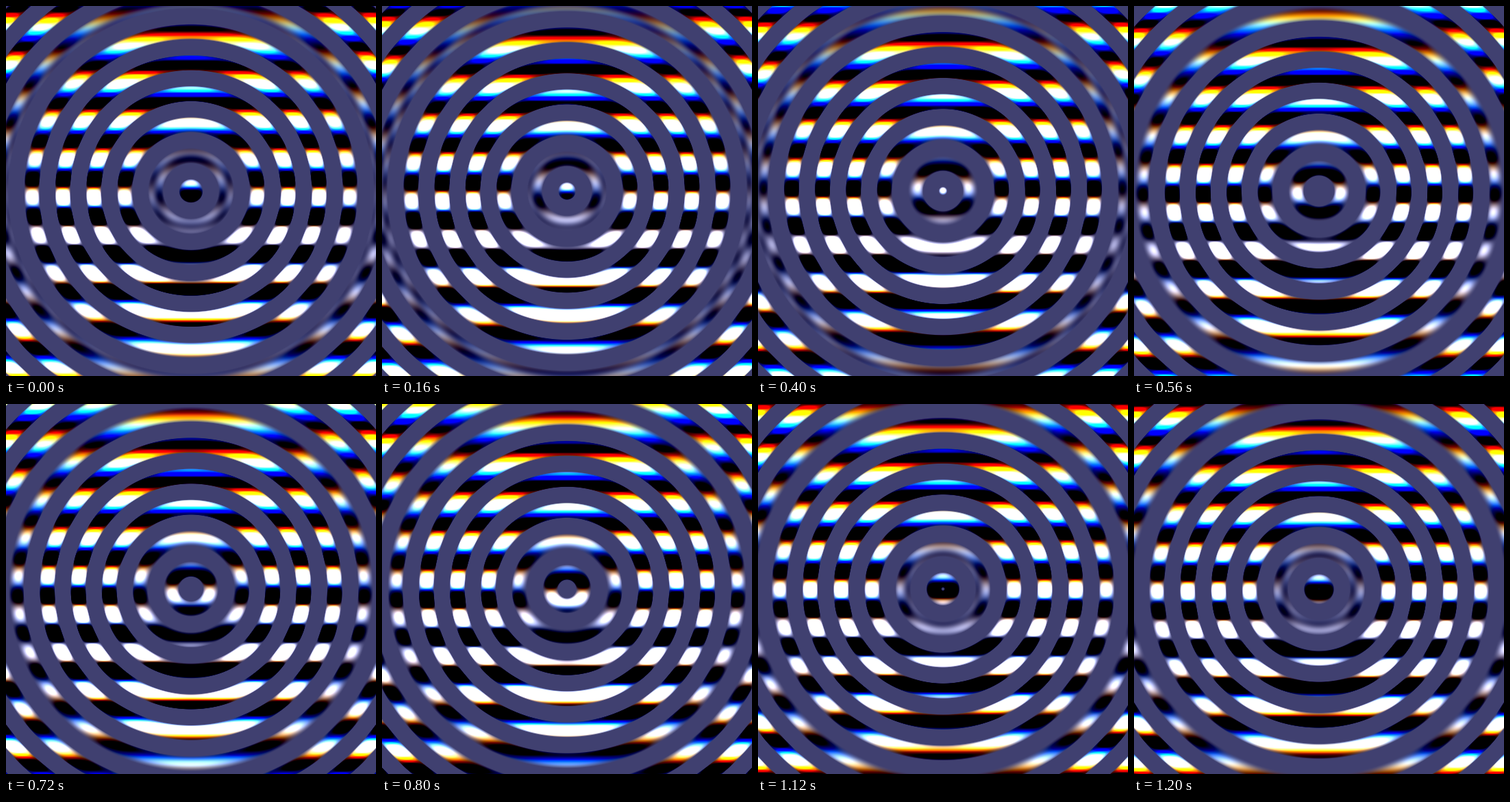
Write an HTML page with a canvas that moves like this. It is 540x540 px and loops after 1.28 s.

```html
<!DOCTYPE html>
<html lang="en">
<head>
<meta charset="utf-8">
<title>Rings and stripes</title>
<style>
  html, body { margin: 0; width: 100%; height: 100%; overflow: hidden; background: #404070; }
  canvas { display: block; width: 100vw; height: 100vh; }
</style>
</head>
<body>
<canvas id="stage" width="540" height="540"></canvas>
<script>
const SIZE = 540, MID = SIZE / 2, TAU = 2 * Math.PI;
const LOOP = 1280, STEP = 80;
const GAIN = 4;
const BASE = [64, 64, 112];

// Stripes: each channel has its own pitch; all agree at one height.
const PITCH = 56.55, SPREAD = [1, 1.02, 1.05];
const ALIGN_Y = 345, ALIGN_PHASE = 2.75;

// Rings close in on the centre, one spacing per loop.
const RING = 45.22, RING_START = 6.3;

// Slow contrast wave; the stripes invert where it crosses zero.
const FLIP_R = 53, FLIP_GAP = 218;

const ctx = document.getElementById('stage').getContext('2d');
const image = ctx.createImageData(SIZE, SIZE);
const pixels = image.data;
const radius = new Float32Array(SIZE * SIZE);
const contrast = new Float32Array(SIZE * SIZE);

for (let y = 0, i = 0; y < SIZE; y++) {
  for (let x = 0; x < SIZE; x++, i++) {
    const r = Math.hypot(x + 0.5 - MID, y + 0.5 - MID);
    radius[i] = r;
    contrast[i] = 255 * GAIN * Math.sin(Math.PI * (r - FLIP_R) / FLIP_GAP);
  }
}

// The motion runs in twentieths of a loop and skips some of them.
function phaseAt(ms) {
  const n = Math.floor((ms % LOOP) / STEP);
  return (n + Math.max(0, Math.floor((n - 4) / 3))) / 20;
}

function stripe(y, channel, phase) {
  const k = TAU / PITCH * SPREAD[channel];
  return Math.sin(k * (y - ALIGN_Y) + ALIGN_PHASE - TAU * phase);
}

function draw(phase) {
  const shift = TAU * (phase - RING_START / RING);
  const k = TAU / RING;
  for (let y = 0, i = 0; y < SIZE; y++) {
    const [r, g, b] = [0, 1, 2].map(c => stripe(y + 0.5, c, phase));
    for (let x = 0; x < SIZE; x++, i++) {
      const amp = Math.max(0, Math.cos(k * radius[i] + shift)) * contrast[i];
      const p = i * 4;
      pixels[p] = BASE[0] + amp * r;
      pixels[p + 1] = BASE[1] + amp * g;
      pixels[p + 2] = BASE[2] + amp * b;
      pixels[p + 3] = 255;
    }
  }
  ctx.putImageData(image, 0, 0);
}

let start = null, shown = 0;

function tick(now) {
  if (start === null) start = now;
  const phase = phaseAt(Math.max(0, now - start));
  if (phase !== shown) {
    draw(phase);
    shown = phase;
  }
  requestAnimationFrame(tick);
}

draw(0);
requestAnimationFrame(tick);
</script>
</body>
</html>
```
